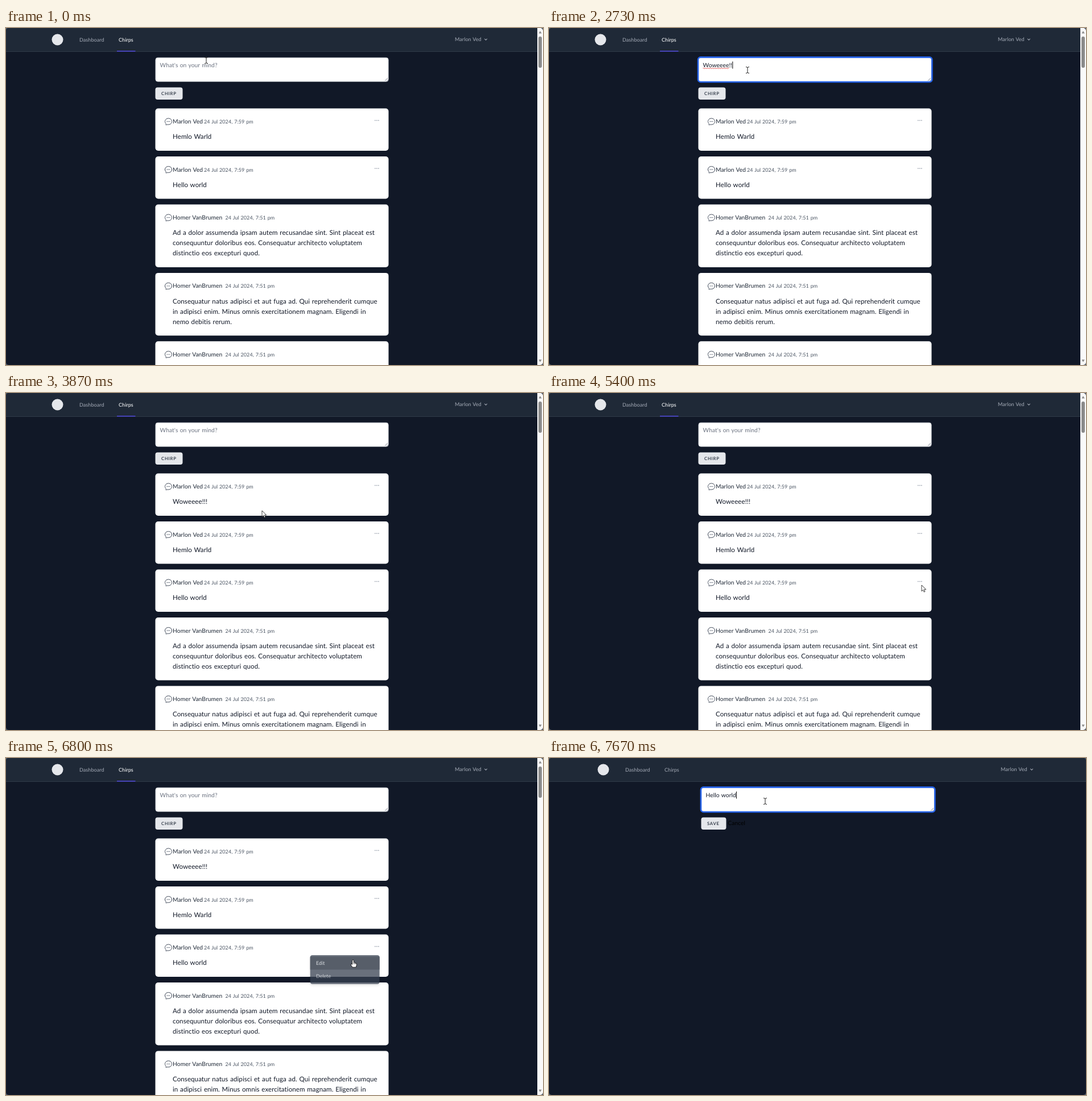
Animation, 944 px wide and 593 px high, one loop 8000 ms. Source, as an HTML page:

```html
<!DOCTYPE html>
<html lang="en">
<head>
<meta charset="utf-8">
<title>Chirps</title>
<style>
  html, body { margin: 0; width: 100%; height: 100%; overflow: hidden; background: #4b5563; }
  svg { display: block; width: 944px; height: 593px; }
  text { font-family: Lato, "Open Sans", sans-serif; letter-spacing: .006em; word-spacing: .06em;
         text-rendering: geometricPrecision; white-space: pre; }
  .button { font-weight: 600; letter-spacing: .1em; }
  .nav { font-weight: 500; }
  .menu { filter: drop-shadow(0 2px 2px rgba(0, 0, 0, .16)); }
</style>
</head>
<body>
<svg id="stage" viewBox="0 0 944 593"></svg>
<script>
const LOOP = 8000;
const TICK = 200 / 3;
const USER = { name: "Marlon Ved", dateX: 348, date: "24 Jul 2024, 7:59 pm", own: true };
const GUEST = { name: "Homer VanBrumen", dateX: 385.5, date: "24 Jul 2024, 7:51 pm" };
const MESSAGE = "Woweeee!!!";

const olderChirps = [
  { by: USER, lines: ["Hemlo Warld"] },
  { by: USER, lines: ["Hello world"] },
  { by: GUEST, lines: ["Ad a dolor assumenda ipsam autem recusandae sint. Sint placeat est",
    "consequuntur doloribus eos. Consequatur architecto voluptatem",
    "distinctio eos excepturi quod."] },
  { by: GUEST, lines: ["Consequatur natus adipisci et aut fuga ad. Qui reprehenderit cumque",
    "in adipisci enim. Minus omnis exercitationem magnam. Eligendi in",
    "nemo debitis rerum."] },
  { by: GUEST, lines: ["", "", ""] },
];

const keyTimes = [1200, 1330, 1470, 1730, 1870, 2000, 2130, 2470, 2670, 2800];
const focusTime = 330, clickTime = 3330, postTime = 3470;
const menuTime = 6070, menuLeave = 6730, editTime = 6870, editFocus = 7670;

// time, x, y, pointer shape from then on
const pointerPath = [
  [0, 352, 57, "beam"], [270, 349, 74, "beam"], [2800, 349, 74, "beam"],
  [2930, 332, 93, "arrow"], [3070, 306, 107, "hand"], [3270, 294, 114, "hand"],
  [3470, 294, 114, "hand"], [3600, 330, 137, "arrow"], [3870, 450, 207, "arrow"],
  [4070, 400, 201, "arrow"], [4270, 345, 192, "beam"], [4400, 333, 176, "beam"],
  [4530, 340, 170, "beam"], [4670, 390, 200, "arrow"], [5200, 644, 342, "arrow"],
  [5400, 655, 338, "arrow"], [5530, 654, 334, "hand"], [5730, 653, 332, "hand"],
  [6070, 653, 332, "hand"], [6530, 610, 356, "hand"], [6870, 610, 355, "arrow"],
  [7070, 610, 355, "arrow"], [7530, 398, 92, "beam"], [7600, 380, 76, "beam"],
  [8000, 380, 76, "beam"],
];

const pointerShapes = {
  arrow: `<path d="M0 0V10.8L2.5 8.5 4.2 12.2 6 11.4 4.3 7.8H7.8Z" fill="#fff" stroke="#111" stroke-width=".8"/>`,
  hand: `<path d="M-1.3 8V1.2Q-1.2 0 0 0T1.3 1.2V4.6Q2.6 3.9 3.2 5.2 4.6 4.7 4.9 6 6.3 5.6 6.3 7.2V9.4L5.3 13H-.9L-3.9 8.8Q-4.3 7.4-3 7.2Z" fill="#fff" stroke="#111" stroke-width=".9"/>
    <path d="M1.3 5V7.5M3.2 5.4V7.5M4.9 6.2V7.6" stroke="#111" stroke-width=".7"/>`,
  beam: `<path d="M-3-5.5Q0-5.5 0-4 0-5.5 3-5.5M0-4V4M-3 5.5Q0 5.5 0 4 0 5.5 3 5.5" fill="none" stroke="#222"/>`,
};

const clamp = v => Math.max(0, Math.min(1, v));
const rect = (x, y, w, h, fill, rx = 0, more = "") =>
  `<rect x="${x}" y="${y}" width="${w}" height="${h}" rx="${rx}" fill="${fill}" ${more}/>`;
const text = (x, y, size, fill, words, more = "") =>
  `<text x="${x}" y="${y}" font-size="${size}" fill="${fill}" ${more}>${words}</text>`;
const line = (d, stroke, width = 1) =>
  `<path d="${d}" fill="none" stroke="${stroke}" stroke-width="${width}"/>`;
const dots = (x, y, gap, r, fill) =>
  [0, 1, 2].map(i => `<circle cx="${x + i * gap}" cy="${y}" r="${r}" fill="${fill}"/>`).join("");

function pointer(t) {
  const i = pointerPath.findLastIndex(key => key[0] <= t);
  const [t0, x0, y0, shape] = pointerPath[i];
  const [t1, x1, y1] = pointerPath[i + 1];
  const p = (t - t0) / (t1 - t0);
  return { x: x0 + (x1 - x0) * p, y: y0 + (y1 - y0) * p, shape };
}

function header(editing) {
  return text(129, 24, 9, "#9ca3af", "Dashboard", 'class="nav"')
    + text(198, 24, 9, editing ? "#9ca3af" : "#f9fafb", "Chirps", 'class="nav"')
    + (editing ? "" : rect(195, 40, 32.5, 1.4, "#4f46e5"))
    + `<circle cx="90.5" cy="20.5" r="10" fill="#e5e7eb"/>`
    + text(789, 23.3, 9, "#9ca3af", USER.name, 'class="nav"')
    + line("M841.2 18.9l2.3 2.3 2.3-2.3", "#9ca3af", 1.1);
}

function textarea(value, focused, caret) {
  return rect(262.9, 52.2, 409.3, 42, "#fff", 4, 'stroke="#d1d5db" stroke-width=".7"')
    + (focused ? rect(262, 51.4, 411.4, 43.6, "none", 4.5, 'stroke="#2563eb" stroke-width="2.6"') : "")
    + line("M666 93l5-5M669 93.2l2-2", "#6b7280", .8)
    + (value ? "" : text(270.5, 68.7, 10.29, "#6b7280", "What's on your mind?"))
    + text(270.5, 68.7, 10.29, "#111827", value, 'id="typed"')
    + (caret ? rect(270.5, 59, 1, 12.5, "#000", 0, 'id="caret"') : "");
}

function button(label, width, hover, ring) {
  return (ring ? rect(261, 103, 51, 24.6, "#1f2937", 5, 'stroke="#6366f1" stroke-width="1.3"') : "")
    + rect(262.5, 104.5, width, 21.5, hover ? "#fff" : "#e5e7eb", 4)
    + text(273, 118, 7.71, "#1f2937", label, 'class="button"');
}

function chirp({ by, lines }, y) {
  const height = 56.4 + lines.length * 18;
  const bubble = "M285.5 170C289 170 291.5 167.5 291.5 164.5S289 159 285.5 159 279.5 161.5 279.5 164.5"
    + "C279.5 166 280.2 167.3 281.2 168.3 281.7 169 281.3 169.7 280.8 170.3 282 170.7 283.2 170.3 284 169.8Z";
  return rect(262.5, y, 410, height, "#fff", 5)
    + `<g transform="translate(0 ${y - 141.5})">`
    + line(bubble, "#374151") + dots(283.2, 164.5, 2.25, .65, "#374151")
    + text(293, 168, 10.29, "#1f2937", by.name)
    + text(by.dateX, 168, 9, "#4b5563", by.date)
    + (by.own ? dots(648.9, 162.6, 3, .95, "#9ca3af") : "")
    + lines.map((words, i) => text(293, 195.3 + i * 18, 11.57, "#111827", words)).join("")
    + "</g>";
}

function chirpList(chirps) {
  let y = 141.5;
  return chirps.map(item => {
    const card = chirp(item, y);
    y += 66.6 + item.lines.length * 18 - (item.lines.length > 1 ? .2 : .1);
    return card;
  }).join("");
}

function scrollbar() {
  return rect(934, 0, 10, 593, "#fafafa") + rect(936, 15, 6, 55, "#8b8b8b", 3)
    + `<path d="M936.3 9.5h5.4L939 5.3ZM936.3 583.5h5.4L939 587.7Z" fill="#8b8b8b"/>`;
}

function menu(t, hover) {
  const shown = t < menuLeave ? clamp((t - menuTime + 60) / 200) : t < 6800 ? .92 : .75;
  const scale = .95 + .05 * shown;
  return `<g class="menu" opacity="${shown}" transform="translate(656.6 347) scale(${scale}) translate(-123.4 0)">`
    + rect(0, 0, 123.4, 51.4, "#374151", 4)
    + (hover ? rect(0, 2.6, 123.4, 23.1, "#1f2937") : "")
    + text(10.3, 16.8, 9, "#d1d5db", "Edit") + text(10.3, 40, 9, "#d1d5db", "Delete") + "</g>";
}

function chirpsPage(t, cursor) {
  const posted = t >= postTime;
  const value = posted ? "" : MESSAGE.slice(0, keyTimes.filter(k => t >= k).length);
  const focused = t >= focusTime && t < clickTime;
  const caret = focused && (t < 870 || t >= keyTimes[0]);
  const overButton = cursor.shape === "hand" && t < 3600;
  const misspelt = t >= 2670 && !posted;
  const chirps = posted ? [{ by: USER, lines: [MESSAGE] }, ...olderChirps] : olderChirps;
  return header(false) + textarea(value, focused, caret)
    + (misspelt ? line("M270.5 71q1-2 2 0" + "t2 0".repeat(22), "#dc2626", .8) : "")
    + button("CHIRP", 48, overButton, t >= clickTime && !posted)
    + chirpList(chirps) + scrollbar()
    + (t >= menuTime ? menu(t, cursor.y > 349.6) : "");
}

function editPage(t) {
  const focused = t >= editFocus;
  return `<g transform="translate(5 0)">` + header(true)
    + textarea("Hello world", focused, focused) + button("SAVE", 44)
    + text(309.3, 118, 10.29, "#000", "Cancel") + "</g>";
}

function draw(t) {
  const cursor = pointer(t);
  stage.innerHTML = `<clipPath id="window"><rect width="944" height="593" rx="5"/></clipPath>
    <g clip-path="url(#window)">`
    + rect(0, 0, 944, 593, "#111827") + rect(0, 0, 944, 41, "#1f2937") + rect(0, 41, 944, .8, "#374151")
    + (t < editTime ? chirpsPage(t, cursor) : editPage(t)) + "</g>"
    + `<g transform="translate(${cursor.x} ${cursor.y})">${pointerShapes[cursor.shape]}</g>`;
  const caret = document.getElementById("caret");
  if (caret) caret.setAttribute("x", 270.7 + document.getElementById("typed").getComputedTextLength());
}

const stage = document.getElementById("stage");
const start = performance.now();
let lastTime = -1;

function frame() {
  const elapsed = (performance.now() - start) % LOOP;
  const step = Math.floor((elapsed + 4) / TICK);
  const t = Math.min(Math.round(step * TICK / 10) * 10, LOOP - 10);
  if (t !== lastTime) draw(lastTime = t);
  requestAnimationFrame(frame);
}
frame();
</script>
</body>
</html>
```
